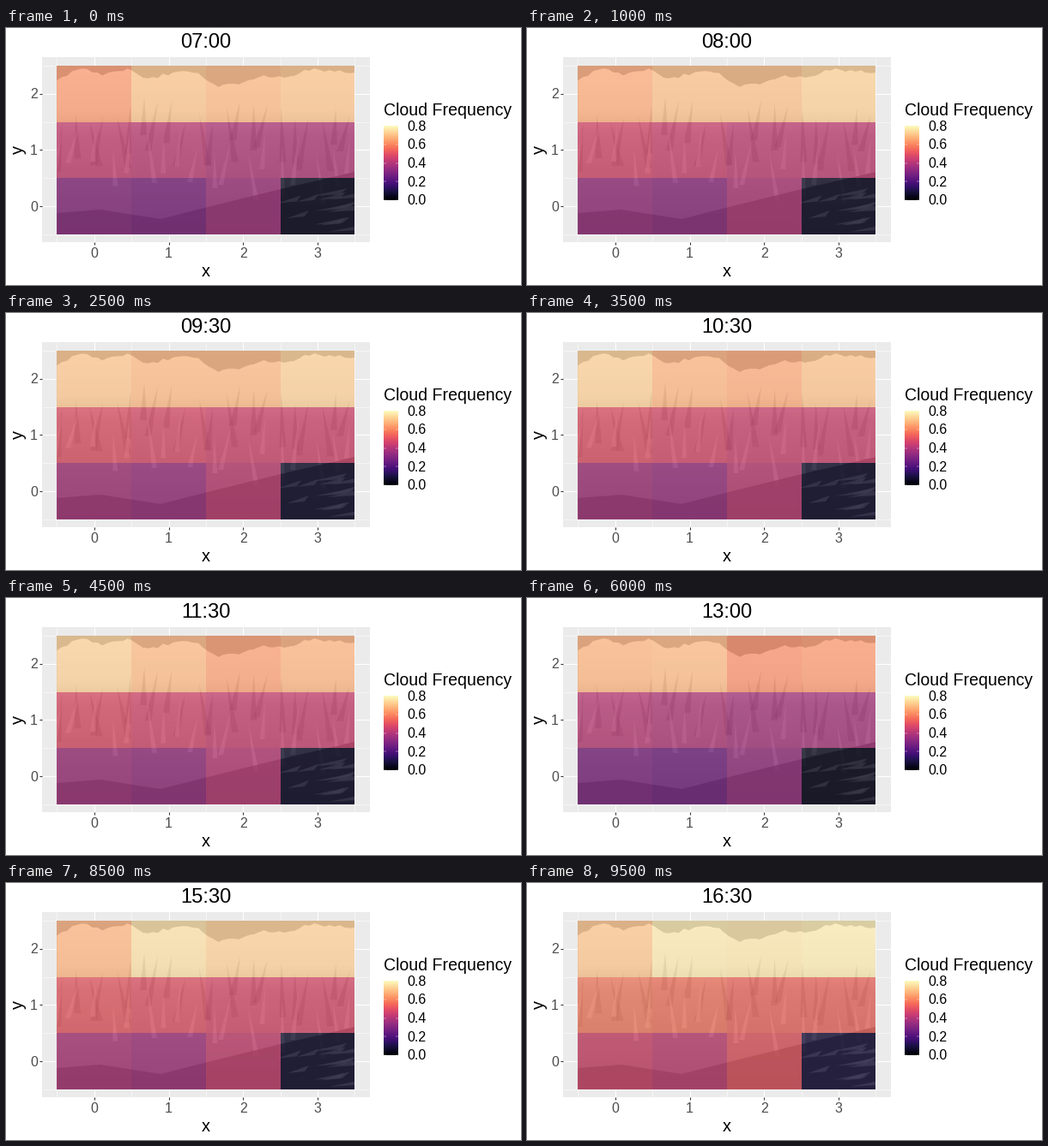
A matplotlib script that plays this animation: 600x300 px, repeating every 10 s.

```python
import random

import matplotlib.pyplot as plt
import numpy as np
from matplotlib.animation import FuncAnimation
from matplotlib.patches import Polygon, Rectangle

W, H, DPI = 600, 300, 100
FRAMES, INTERVAL = 20, 500
PX = 72 / DPI
LEFT, RIGHT, TOP, BOTTOM = 59.4, 406.4, 44, 240.8
PANEL = (42, 34, 424, 250.3)
MAGMA = plt.get_cmap("magma")

plt.rcParams["font.family"] = "Liberation Sans"
fig = plt.figure(figsize=(W / DPI, H / DPI), dpi=DPI, facecolor="white")
ax = fig.add_axes([0, 0, 1, 1])
ax.axis("off")


def text(x, y, s, size, color="black", **kw):
    return ax.text(x, y, s, fontsize=size * PX, color=color,
                   va="baseline", **kw)


def line(xs, ys, color="white", width=1.07, z=1):
    ax.plot(xs, ys, color=color, lw=width * PX, zorder=z,
            solid_capstyle="butt")


def box(x0, y0, x1, y1, color, z):
    return ax.add_patch(Rectangle((x0, y0), x1 - x0, y1 - y0, fc=color,
                                  ec="none", zorder=z))


def picture(data, extent, z, **kw):
    return ax.imshow(data, extent=extent, aspect="auto", zorder=z, **kw)


def col_x(x):
    return LEFT + (x + 0.5) * (RIGHT - LEFT) / 4


def row_y(y):
    return BOTTOM - (y + 0.5) * (BOTTOM - TOP) / 3


def draw_panel():
    x0, y0, x1, y1 = PANEL
    box(x0, y0, x1, y1, "#EBEBEB", 0)
    for k in range(5):
        line([col_x(k - 0.5)] * 2, [y0, y1], width=0.53)
    for k in range(4):
        line([x0, x1], [row_y(k - 0.5)] * 2, width=0.53)
    for k in range(4):
        x = col_x(k)
        line([x, x], [y0, y1])
        line([x, x], [y1, y1 + 2.75], "#333333")
        text(x, 268, str(k), 16, "#4D4D4D", ha="center")
    for k in range(3):
        y = row_y(k)
        line([x0, x1], [y, y])
        line([x0 - 2.75, x0], [y, y], "#333333")
        text(37, y + 5.7, str(k), 16, "#4D4D4D", ha="right")
    text(233, 290, "x", 20, ha="center")
    text(19.5, 142.4, "y", 20, ha="center", rotation=90,
         rotation_mode="anchor")


def draw_mountains():
    frame = box(LEFT, TOP, RIGHT, BOTTOM, "#87878A", 2)

    def shape(points, gray, alpha=1.0, z=3):
        patch = ax.add_patch(Polygon(points, fc=str(gray), ec="none",
                                     alpha=alpha, zorder=z))
        patch.set_clip_path(frame)
        return patch

    def streaks(count, top, bottom, half_width, gray, alpha):
        for x in np.linspace(LEFT + 6, RIGHT - 6, count):
            y, lean = rng.uniform(top, bottom), rng.uniform(-13, 13)
            foot = y + rng.uniform(40, 65)
            shape([(x, y), (x + lean + half_width, foot),
                   (x + lean - half_width, foot)], gray, alpha)

    rng = random.Random(7)
    peaks = [62, 47, 56, 48, 59, 53, 51, 69, 65, 56, 58, 48, 51, 52]
    xs = np.linspace(LEFT, RIGHT, 60)
    crest = np.interp(xs, np.linspace(LEFT, RIGHT, len(peaks)), peaks)
    ridge = [(x, y + rng.uniform(-2, 2)) for x, y in zip(xs, crest)]
    outline = shape(ridge + [(RIGHT, BOTTOM), (LEFT, BOTTOM)], 0.8, z=2.1)
    tones = np.interp(np.linspace(TOP, BOTTOM, 100), [44, 95, 125, 185, 241],
                      [0.94, 0.87, 0.67, 0.54, 0.45])
    slope = picture(tones[:, None], (LEFT, RIGHT, BOTTOM, TOP), 2.2,
                    cmap="gray", vmin=0, vmax=1, interpolation="bilinear")
    slope.set_clip_path(outline)

    streaks(22, 80, 115, 4, 0.3, 0.35)
    streaks(18, 112, 145, 3, 0.85, 0.5)

    # Dark foreground slope with slanting patches of snow.
    shape([(LEFT, 216), (110, 212), (180, 223), (235, 209), (320, 188),
           (RIGHT, 168), (RIGHT, BOTTOM), (LEFT, BOTTOM)], 0.24, 0.75, 3.1)
    for _ in range(12):
        x, length = rng.uniform(315, 380), rng.uniform(20, 45)
        y = rng.uniform(192, 240)
        shape([(x, y), (x + length, y - 9), (x + length * 0.8, y - 2)],
              0.72, 0.65, 3.2)


def draw_legend():
    x0, x1, y0, y1 = 440, 457, 114.3, 200.7
    text(440, 102, "Cloud Frequency", 19.55)
    picture(MAGMA(np.linspace(1, 0, 256))[:, None], (x0, x1, y1, y0), 3)
    for k in range(5):
        y = y1 - k * (y1 - y0) / 4
        for a, b in ((x0, x0 + 3.4), (x1 - 3.4, x1)):
            line([a, b], [y, y], width=0.4, z=4)
        text(467, y + 5.6, f"{0.2 * k:.1f}", 16)


MEAN = np.array([[.85, .87, .83, .86],
                 [.60, .58, .55, .55],
                 [.45, .42, .51, .07]])
PEAK_STEP = np.array([9, 16, 0, 2])


def cloudiness(step):
    """Mean cover plus a daily trend; the top row also has a column wave."""
    trend = np.interp(step, [0, 4, 9, 12, 15, 19],
                      [-.05, .03, .01, -.08, -.04, .13])
    cover = MEAN + trend * 4 * MEAN * (1 - MEAN)
    cover[0] += 0.045 * np.cos(2 * np.pi * (step - PEAK_STEP) / 19)
    return cover.clip(0, 1)


draw_panel()
draw_mountains()
draw_legend()
tiles = [box(col_x(c - 0.5), row_y(r + 0.5), col_x(c + 0.5), row_y(r - 0.5),
             "none", 5)
         for r in (2, 1, 0) for c in range(4)]
title = text(232.7, 23, "", 23.8, ha="center")
ax.set_xlim(0, W)
ax.set_ylim(H, 0)


def update(step):
    hours, minutes = divmod(7 * 60 + 30 * step, 60)
    title.set_text(f"{hours:02d}:{minutes:02d}")
    for tile, cover in zip(tiles, cloudiness(step).flat):
        tile.set_facecolor(MAGMA(cover, alpha=0.7))
    return *tiles, title


anim = FuncAnimation(fig, update, frames=FRAMES, interval=INTERVAL,
                     repeat=True, repeat_delay=0)
plt.show()
```
